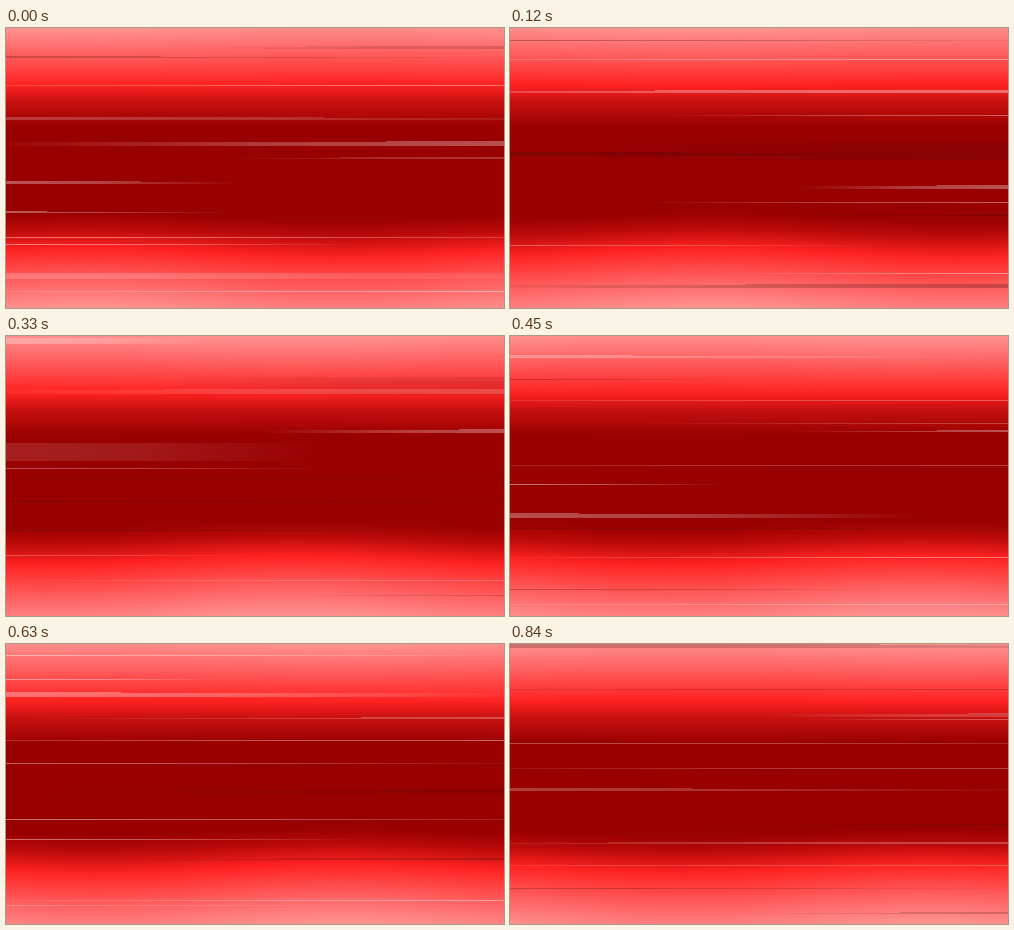
Animation of 498 by 280 pixels, one loop 0.87 s. Source, as an HTML page with a canvas:

```html
<!DOCTYPE html>
<html lang="en">
<head>
<meta charset="utf-8">
<title>Speed lines</title>
<style>
  html, body { margin: 0; width: 100%; height: 100%; overflow: hidden; background: #900; }
  canvas { display: block; width: 498px; height: 280px; }
</style>
</head>
<body>
<canvas id="stage" width="498" height="280"></canvas>
<script>
const W = 498, H = 280;
const STEP = 30, COUNT = 29;   // ms per pose, poses per loop
const STREAKS = 12;
const WAVES = 9;               // sway cycles per loop
const STRIP = 6;
const ctx = document.getElementById('stage').getContext('2d');

const stops = [
  [0, '#ff9090'], [0.07, '#ff6a6a'], [0.2, '#ff2222'], [0.26, '#c81010'],
  [0.35, '#990000'], [0.66, '#990000'], [0.72, '#bc0a0a'], [0.79, '#ff2222'],
  [0.9, '#ff5e5e'], [1, '#ff9090']
];

function seeded(seed) {
  let s = seed * 7919 + 13;
  const next = () => (s = (s * 16807) % 2147483647) / 2147483647;
  for (let i = 0; i < 5; i++) next();
  return next;
}

function gradient(x0, y0, x1, y1, list) {
  const g = ctx.createLinearGradient(x0, y0, x1, y1);
  list.forEach(([at, colour]) => g.addColorStop(at, colour));
  return g;
}

// The dark band bulges in a wave that runs to the right
function drawBase(pose) {
  const crest = W * (0.66 + WAVES * pose / COUNT);
  for (let x = 0; x < W; x += STRIP) {
    const sway = Math.cos((x + STRIP / 2 - crest) / W * Math.PI * 2);
    ctx.fillStyle = gradient(0, -2 * sway, 0, H + 4 + 6 * sway, stops);
    ctx.fillRect(x, 0, STRIP, H);
  }
}

function drawStreak(y, h, reach, bend, rgb, alpha) {
  const from = reach > 0 ? 0 : W;
  ctx.fillStyle = gradient(from, 0, from + reach, 0, [
    [0, `rgba(${rgb},${alpha})`],
    [0.4, `rgba(${rgb},${alpha * 0.8})`],
    [1, `rgba(${rgb},0)`]
  ]);
  // Thin streaks lose a pixel of weight past the bend
  const body = Math.round(reach * bend);
  const thin = h > 1 && h < 6 ? h - 1 : h;
  ctx.fillRect(from, y, body, h);
  ctx.fillRect(from + body, y + h - thin, reach - body, thin);
}

function drawStreaks(pose) {
  const rnd = seeded(pose + 1);
  for (let i = 0; i < STREAKS; i++) {
    const y = Math.floor((i + rnd()) * H / STREAKS);
    const h = rnd() < 0.05 ? 18 : 1 + Math.floor(rnd() ** 2.5 * 6);
    const reach = (200 + rnd() * 650) * (rnd() < 0.5 ? 1 : -1);
    const bend = 0.15 + rnd() * 0.5;
    const dark = rnd() < 0.35;
    const alpha = (0.25 + rnd() * 0.25) / (1 + h / 10);
    drawStreak(y, h, reach, bend, dark ? '60,15,15' : '255,255,255', dark ? alpha * 0.8 : alpha);
  }
}

function render() {
  const pose = Math.floor(performance.now() / STEP) % COUNT;
  drawBase(pose);
  drawStreaks(pose);
  requestAnimationFrame(render);
}
render();
</script>
</body>
</html>
```
